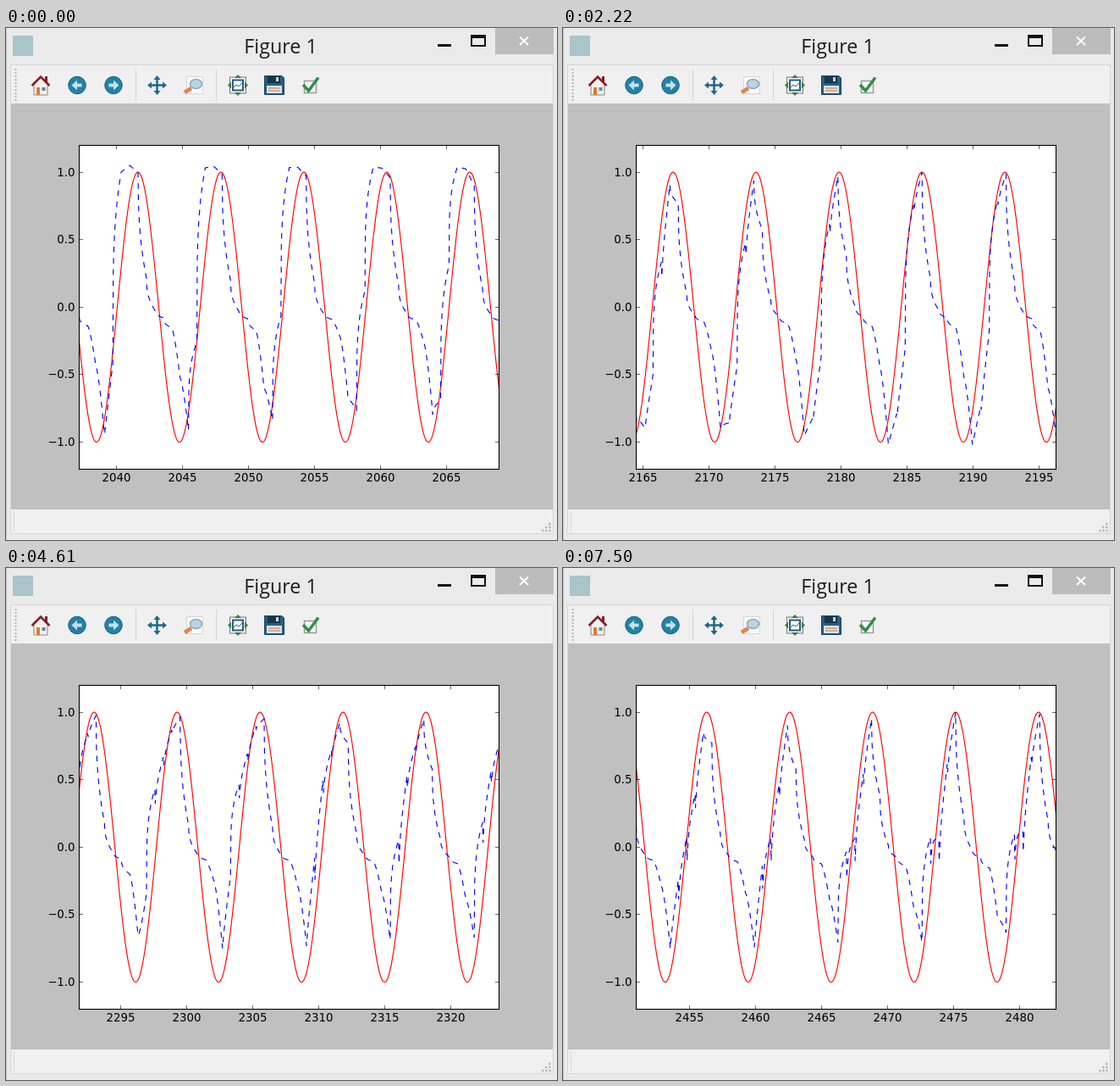
Write an HTML page that moves like this. It is 651 px wide and 604 px high and loops after 8000 ms.

```html
<!DOCTYPE html>
<html lang="en">
<head>
<meta charset="utf-8">
<title>Figure 1</title>
<style>
html, body { margin: 0; width: 100%; height: 100%; overflow: hidden; background: #eaeaea; }
svg { display: block; }
.label { font: 13.33px "DejaVu Sans", sans-serif; }
.title { font: 23.3px "Open Sans", sans-serif; fill: #1c1c1c; }
</style>
</head>
<body>
<svg width="651" height="604" viewBox="0 0 651 604">
  <!-- window -->
  <rect width="651" height="604" fill="#eaeaea"/>
  <path d="M.5 0V604" stroke="#c4c4c4"/>
  <rect x="8" y="9" width="24" height="24" fill="#a9c5c9"/>
  <text class="title" x="324.5" y="30" text-anchor="middle">Figure 1</text>
  <rect x="510" y="19" width="16" height="3" fill="#111"/>
  <path d="M550 9V21H566V9" fill="none" stroke="#111" stroke-width="2"/>
  <rect x="549" y="8" width="18" height="4" fill="#111"/>
  <rect x="578" width="69" height="31" fill="#bcbcbc"/>
  <path d="M607 10.5L617 20M617 10.5L607 20" stroke="#fff" stroke-width="2"/>
  <rect x="5.5" y="43.5" width="641" height="553" fill="#f0f0f0" stroke="#d6d6d6"/>
  <rect x="6" y="89" width="640" height="479" fill="#bfc0bf"/>
  <path d="M9.5 570V594" stroke="#d9d9d9"/>
  <path d="M11.5 48V87" stroke="#b4b4b4" stroke-width="2" stroke-dasharray="2 2"/>
  <path d="M153.5 49V85M248.5 49V85" stroke="#d2d2d2"/>
  <path d="M641 585h3M637 589h7M633 593h11" stroke="#b8b8b8" stroke-width="2.5" stroke-dasharray="2.5 1.7"/>

  <!-- toolbar: home -->
  <rect x="46" y="57" width="3" height="7" fill="#7d1f2b"/>
  <path d="M33 67L41 59L49 67V79H33Z" fill="#f4f1ec" stroke="#8c8580"/>
  <path d="M30.5 68L41 57.5L51.5 68" fill="none" stroke="#8c1d2c" stroke-width="2.5"/>
  <rect x="36" y="70" width="4" height="9" fill="#e07a35"/>
  <rect x="42.5" y="70" width="4" height="4" fill="#5b87a8"/>
  <!-- back and forward -->
  <g id="arrow">
    <circle cx="84" cy="67.5" r="10.3" fill="#2381a6" stroke="#175c7c"/>
    <path d="M77.5 67.5L84 61.5V65.5H89.5V69.5H84V73.5Z" fill="#c5e0ec"/>
  </g>
  <use href="#arrow" transform="matrix(-1 0 0 1 211 0)"/>
  <!-- pan -->
  <path d="M170 67.5H187M178.5 59V76" stroke="#1f6789" stroke-width="2.5"/>
  <path d="M167 67.5l5-4v8ZM190 67.5l-5-4v8ZM178.5 56l-4 5h8ZM178.5 79l-4-5h8Z" fill="#1f6789"/>
  <!-- zoom -->
  <path d="M213.5 57.5H232.5V77.5H213.5Z" fill="#fafafa" stroke="#d5d5d5"/>
  <path d="M211 76L219 71" stroke="#e38350" stroke-width="5"/>
  <ellipse cx="224.500" cy="66" rx="7" ry="5.500" fill="#b9d5e4" stroke="#8ea6b3" stroke-width="1.500"/>
  <!-- subplots -->
  <rect x="264.5" y="58" width="19" height="19" fill="#f5f5f5" stroke="#777"/>
  <rect x="268" y="61.5" width="12" height="12" fill="#fff" stroke="#245f85" stroke-width="2"/>
  <path d="M269 70l3-3 3 2 4-4" fill="none" stroke="#245f85"/>
  <path d="M274 55l-4 4h8ZM274 80l-4-4h8ZM262 67.5l4-4v8ZM286 67.5l-4-4v8Z" fill="#3b7d45"/>
  <!-- save -->
  <path d="M305.5 56.5H326L328.5 59V78.5H305.5Z" fill="#285f80" stroke="#17425d"/>
  <rect x="309" y="57" width="15" height="8" fill="#16364a"/>
  <rect x="319" y="58" width="3" height="5" fill="#c9d5dc"/>
  <rect x="308" y="68" width="18" height="9" fill="#d9e3e8"/>
  <path d="M310 71H324M310 74H324" stroke="#cc7550"/>
  <!-- options -->
  <rect x="352.5" y="62.5" width="14" height="14" fill="#f8f8f8" stroke="#999" stroke-width="1.5"/>
  <path d="M351 67L357.5 74L369 58.5" fill="none" stroke="#2f9145" stroke-width="3.5"/>

  <!-- plot -->
  <clipPath id="axes"><rect x="86.5" y="138.5" width="496" height="382"/></clipPath>
  <rect x="86.5" y="138.5" width="496" height="382" fill="#fff"/>
  <g clip-path="url(#axes)" fill="none" stroke-width="1.15">
    <path id="wave" stroke="#f00"/>
    <path id="guess" stroke="#00f" stroke-dasharray="6.67 6.67"/>
  </g>
  <path id="ticks" stroke="#000" stroke-width=".6"/>
  <rect x="86.5" y="138.5" width="496" height="382" fill="none" stroke="#000" stroke-width="1.1"/>
  <g id="labels" class="label"></g>
</svg>
<script>
const STEP = 0.1 / Math.PI, STEPS = 1000, CHUNK = 20;
const LEFT = 86.5, TOP = 138.5, RIGHT = 582.5, BOTTOM = 520.5;
const FIRST_WINDOW = 64, PHASE = 0.4;
const starts = [0, 530, 1040, 1670, 2220, 2830, 3460, 4000, 4610, 5160, 5710, 6340, 6950, 7500];

// Prediction over one turn of the wave, from peak to peak, as [turn, value].
const fall = [[0, 1], [0.05, 0.95], [0.1, 0.22], [0.15, 0.15], [0.2, -0.02], [0.28, -0.07],
  [0.36, -0.1], [0.42, -0.17], [0.49, -0.42], [0.54, -0.72]];
// The way back up changes while the network learns: values at turns 0.6, 0.7, 0.8, 0.9.
const climbs = [
  { k: 0, v: [-0.96, -0.4, 1.03, 1.05] },
  { k: 3, v: [-1.1, -1.02, -0.5, 0.82] },
  { k: 6, v: [-0.92, -0.3, 0.1, 0.65] },
  { k: 8, v: [-0.65, 0.35, 0.6, 0.8] },
  { k: 13, v: [-0.7, 0.1, 0.06, 0.62] },
];

const $ = id => document.getElementById(id);
const mix = (a, b, t) => a + (b - a) * t;
const turnAt = x => ((x + PHASE) / (2 * Math.PI)) % 1;
const plotX = i => mix(LEFT, RIGHT, i / (STEPS - 1));
const plotY = v => 329.3 - 159.2 * v;

function turnCurve(k) {
  const n = Math.max(1, climbs.findIndex(c => c.k >= k));
  const a = climbs[n - 1], b = climbs[n];
  const climb = a.v.map((v, i) => [0.6 + i / 10, mix(v, b.v[i], (k - a.k) / (b.k - a.k))]);
  return [...fall, ...climb, [1, 1]];
}

function valueAt(curve, turn) {
  const i = curve.findIndex(p => p[0] > turn);
  const [u0, v0] = curve[i - 1], [u1, v1] = curve[i];
  return mix(v0, v1, (turn - u0) / (u1 - u0));
}

// The network restarts every chunk: it jumps on falls and steep climbs, and slips back on slow ones.
function guessAt(curve, x0, i) {
  const first = i - i % CHUNK, s = (i - first) / CHUNK;
  const x = x0 + first * STEP, turn = turnAt(x);
  const from = valueAt(curve, turn), to = valueAt(curve, turnAt(x + CHUNK * STEP));
  if (turn < 0.33 || turn > 0.96) return mix(from, to, s ** 0.4);
  if (turn < 0.54) return mix(from, to, s ** 1.4);
  if (to - from > 0.65) return mix(from, to, s ** 0.25);
  const slip = i === first ? 0 : 0.28 * Math.max(0, 1 - Math.abs(from)) * Math.exp(-6 * s);
  return mix(from, to, s) - slip;
}

function linePath(value) {
  let d = "";
  for (let i = 0; i < STEPS; i++) {
    d += (i ? "L" : "M") + plotX(i).toFixed(2) + " " + plotY(value(i)).toFixed(2);
  }
  return d;
}

function drawAxes(x0) {
  let ticks = "", labels = "";
  for (let x = Math.ceil(x0 / 5) * 5; x <= x0 + (STEPS - 1) * STEP; x += 5) {
    const px = Math.floor(plotX((x - x0) / STEP)) + 0.5;
    ticks += `M${px} ${TOP}v4.5M${px} ${BOTTOM}v-4.5`;
    labels += `<text x="${px}" y="535" text-anchor="middle">${x}</text>`;
  }
  for (let v = -1; v <= 1; v += 0.5) {
    const py = Math.floor(plotY(v)) + 0.5;
    ticks += `M${LEFT} ${py}h4.5M${RIGHT} ${py}h-4.5`;
    labels += `<text x="81.5" y="${py + 4}" text-anchor="end">${v.toFixed(1).replace("-", "\u2212")}</text>`;
  }
  $("ticks").setAttribute("d", ticks);
  $("labels").innerHTML = labels;
}

function draw(k) {
  const x0 = (FIRST_WINDOW + k) * STEPS * STEP, curve = turnCurve(k);
  $("wave").setAttribute("d", linePath(i => Math.cos(x0 + i * STEP + PHASE)));
  $("guess").setAttribute("d", linePath(i => guessAt(curve, x0, i)));
  drawAxes(x0);
}

let shown = -1;
function frame() {
  const time = performance.now() % 8000;
  const k = starts.filter(s => s <= time).length - 1;
  if (k !== shown) draw(shown = k);
  requestAnimationFrame(frame);
}
frame();
</script>
</body>
</html>
```
